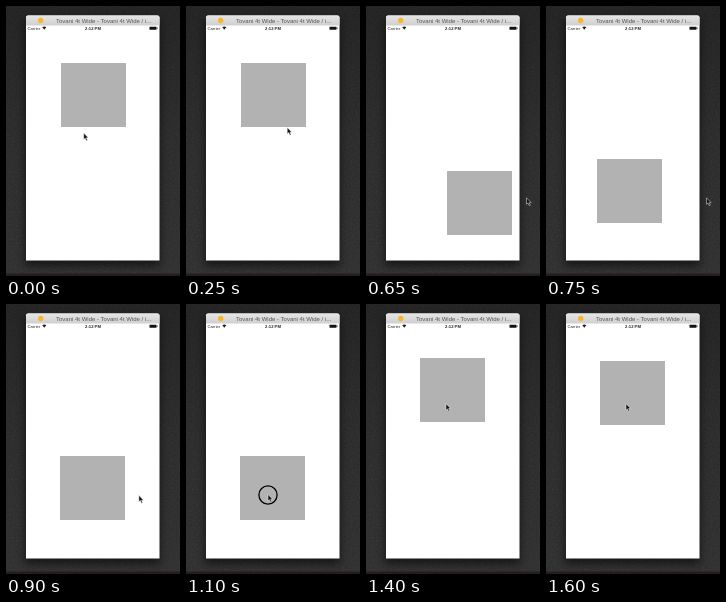
These frames come from a looping animation (174 px wide and 270 px high, 1650 ms). An HTML page:

```html
<!DOCTYPE html>
<html lang="en">
<head>
<meta charset="utf-8">
<title>Drag and snap</title>
<style>
  html, body { margin: 0; width: 100%; height: 100%; overflow: hidden; background: #303030; }
  svg { display: block; width: 100vw; height: 100vh; }
  text { font-family: "Liberation Sans", Arial, sans-serif; }
  .title { font-size: 6px; fill: #555; }
  .status { font-size: 4.2px; fill: #222; }
</style>
</head>
<body>
<svg viewBox="0 0 174 270">
  <defs>
    <linearGradient id="desk" x2="0" y2="1">
      <stop offset="0" stop-color="#292929"/>
      <stop offset=".5" stop-color="#333"/>
      <stop offset="1" stop-color="#383838"/>
    </linearGradient>
    <linearGradient id="bar" x2="0" y2="1">
      <stop offset="0" stop-color="#e6e6e6"/>
      <stop offset="1" stop-color="#cfcfcf"/>
    </linearGradient>
    <filter id="grain" x="0" y="0" width="1" height="1">
      <feTurbulence type="fractalNoise" baseFrequency=".6" numOctaves="2" seed="4"/>
      <feColorMatrix values="0 0 0 0 0  0 0 0 0 0  0 0 0 0 0  .3 0 0 0 -.06"/>
    </filter>
    <filter id="soft" x="-.2" y="-.2" width="1.4" height="1.4">
      <feGaussianBlur stdDeviation="4"/>
    </filter>
  </defs>

  <rect width="174" height="270" fill="url(#desk)"/>
  <rect width="174" height="270" filter="url(#grain)"/>
  <rect y="267.5" width="174" height="2.5" fill="#241e22"/>
  <rect x="19" y="14" width="135" height="246" filter="url(#soft)" opacity=".55"/>

  <path d="M20 254.5V11.5q0-2 2-2H151.5q2 0 2 2V254.5z" fill="#fff"/>
  <path d="M20 19.5V11.5q0-2 2-2H151.5q2 0 2 2V19.5z" fill="url(#bar)"/>
  <circle cx="34.7" cy="14.5" r="2.7" fill="#f8b62c"/>
  <text class="title" x="50" y="16.5">Tovani 4t Wide - Tovani 4t Wide / i...</text>

  <text class="status" x="21.5" y="23.6">Carrier</text>
  <path d="M36.3 21.3q2-1.6 4 0l-2 2.4z" fill="#222"/>
  <text class="status" x="87" y="23.6" text-anchor="middle" font-weight="bold">2:12 PM</text>
  <path d="M143.5 20.7h7v3h-7zM150.9 21.6h.7v1.2h-.7z" fill="#111"/>

  <rect id="box" width="65" height="64" fill="#b2b2b2"/>
  <g id="pointer">
    <circle id="ring" r="9.1" cy=".5" fill="none" stroke="#000" stroke-width="1.3"/>
    <path transform="scale(1.15)" d="M0 0V5.6L1.3 4.5L2.3 6.8L3.3 6.4L2.3 4.2H4z"
          fill="#111" stroke="#fff" stroke-width=".4" stroke-linejoin="round"/>
  </g>
</svg>
<script>
  const LOOP = 1650, STEP = 50;
  const DAMPING = 20, FREQ = 22.4; // per second

  const smooth = p => p * p * (3 - 2 * p);
  const accelerate = p => p ** 2.5;

  const pointerStart = [77.7, 127];
  const moves = [
    { from: 50, to: 350, end: [109.5, 119.5], ease: smooth },
    { from: 400, to: 600, end: [160.5, 191.8], ease: accelerate },
    { from: 800, to: 1050, end: [82, 190.5], ease: smooth },
    { from: 1100, to: 1340, end: [80, 99.7], ease: smooth }
  ];

  // The box follows the pointer from grab to release, then springs home.
  const boxStart = [55, 57];
  const drags = [
    { press: 350, grab: 400, release: 600, home: [54.3, 152.3], kick: [56, 49] },
    { press: 1050, grab: 1130, release: 1340, home: [54.3, 56.5], kick: [0, -10] }
  ];

  const [box, pointer, ring] = ["box", "pointer", "ring"].map(id => document.getElementById(id));
  const add = (a, b, k = 1) => a.map((v, i) => v + b[i] * k);

  function pointerAt(t) {
    return moves.reduce((pos, { from, to, end, ease }) => {
      const p = Math.min(Math.max((t - from) / (to - from), 0), 1);
      return add(pos, add(end, pos, -1), ease(p));
    }, pointerStart);
  }

  function springAt(ms, start, home, kick) {
    const s = ms / 1000, fade = Math.exp(-DAMPING * s);
    const offset = add(start, home, -1);
    return home.map((h, i) =>
      h + fade * (offset[i] * Math.cos(FREQ * s) + kick[i] * Math.sin(FREQ * s)));
  }

  function boxAt(t) {
    return drags.reduce((pos, { grab, release, home, kick }) => {
      if (t < grab) return pos;
      const pulled = add(pointerAt(Math.min(t, release)), pointerAt(grab), -1);
      const held = add(pos, pulled);
      return t < release ? held : springAt(t - release, held, home, kick);
    }, boxStart);
  }

  const place = (el, pos) => el.setAttribute("transform", `translate(${pos})`);

  function draw(now) {
    const t = Math.floor((now % LOOP) / STEP) * STEP;
    place(box, boxAt(t).map(Math.round));
    place(pointer, pointerAt(t));
    const pressed = drags.some(d => t >= d.press && t < d.release);
    ring.setAttribute("visibility", pressed ? "visible" : "hidden");
  }

  const start = performance.now();
  function tick() {
    draw(performance.now() - start);
    requestAnimationFrame(tick);
  }
  tick();
</script>
</body>
</html>
```
